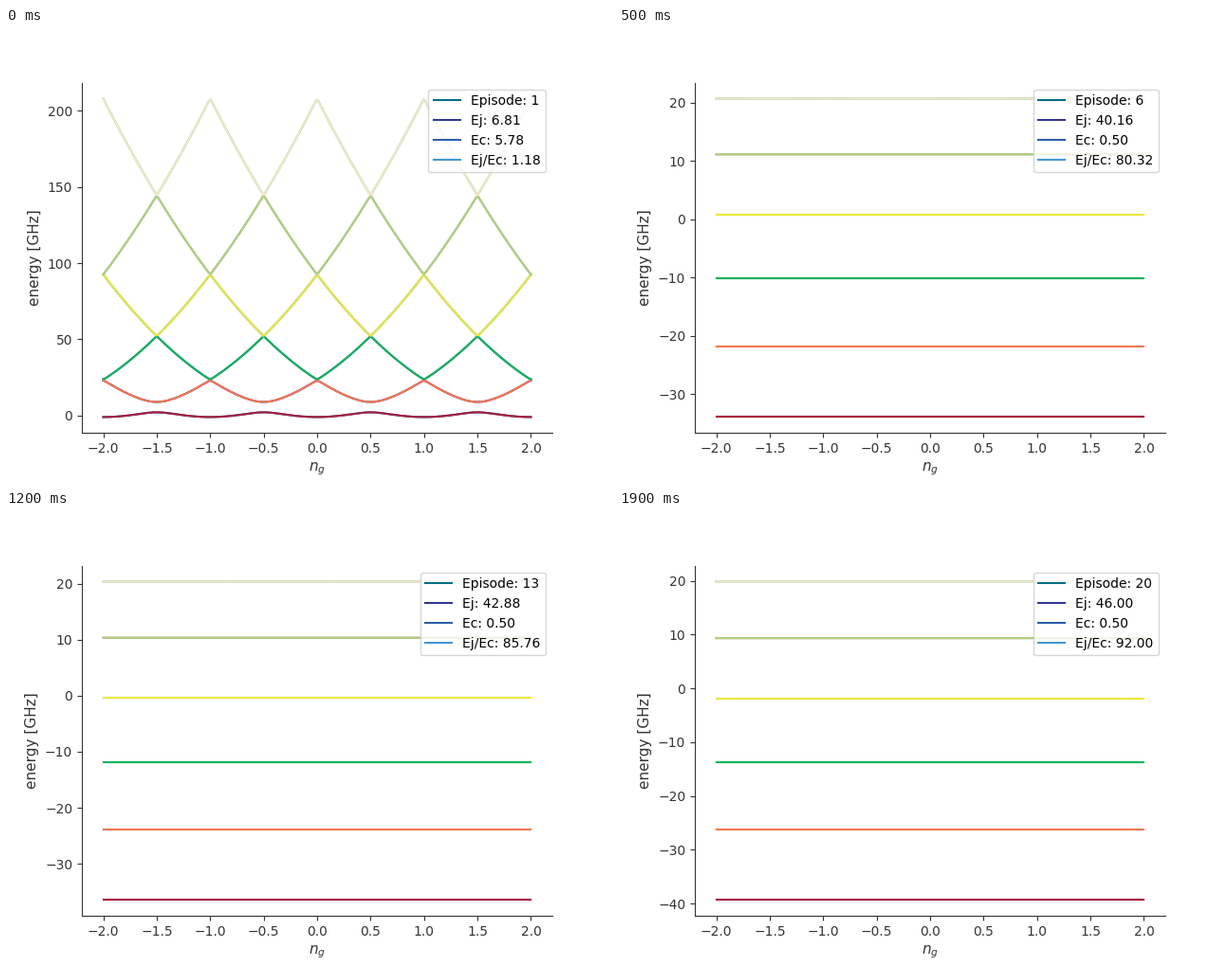
A matplotlib script that plays this animation: 640 px wide and 480 px high, repeating every 2 s.

```python
import numpy as np
import matplotlib.pyplot as plt
from matplotlib.animation import FuncAnimation

GREY = "0.2"
COLORS = ["#016E82", "#333795", "#2E5EAC", "#4498D3", "#CD85B9", "#45C3D1",
          "#AA1D3F", "#F47752", "#19B35A", "#EDE83B", "#ABD379", "#F9E6BE"]
LEVELS = 6
CUTOFF = 15
NG = np.linspace(-2, 2, 220)

# (Ej, Ec) per episode; Ec settles at its lower bound early on
EJ_EC = [(6.81, 5.78), (3.42, 2.87), (0.10, 0.50), (0.10, 0.50), (38.42, 0.50)]
EJ_EC += [(ej, 0.50) for ej in (
    40.16, 46.02, 44.87, 50.00, 47.21, 43.76, 45.32, 42.88,
    43.31, 50.00, 48.40, 42.934, 43.20, 42.61, 46.00)]

plt.rcParams.update({
    "font.family": "DejaVu Sans",
    "font.size": 10,
    "axes.labelsize": 11,
    "axes.edgecolor": GREY,
    "axes.labelcolor": GREY,
    "axes.spines.top": False,
    "axes.spines.right": False,
    "xtick.color": GREY,
    "ytick.color": GREY,
})


def spectrum(ej, ec):
    """Lowest transmon levels for every offset charge."""
    n = np.arange(-CUTOFF, CUTOFF + 1)
    hop = np.eye(len(n), k=1) + np.eye(len(n), k=-1)
    charge = 4 * ec * (n - NG[:, None]) ** 2
    ham = charge[:, :, None] * np.eye(len(n)) - ej / 2 * hop
    return np.linalg.eigvalsh(ham)[:, :LEVELS]


fig, ax = plt.subplots(figsize=(6.4, 4.8), dpi=100)


def draw(i):
    ej, ec = EJ_EC[i]
    energy = spectrum(ej, ec)
    ax.clear()
    ax.set_prop_cycle(color=COLORS)
    # plotted twice: the second half of the colour cycle lies on top
    lines = ax.plot(NG, energy)
    ax.plot(NG, energy)
    ax.set_xlabel("$n_g$")
    ax.set_ylabel("energy [GHz]")
    labels = [f"Episode: {i + 1}", f"Ej: {ej:.2f}", f"Ec: {ec:.2f}",
              f"Ej/Ec: {ej / ec:.2f}"]
    ax.legend(lines[:4], labels, loc="upper right")
    return []


anim = FuncAnimation(fig, draw, frames=len(EJ_EC), interval=100,
                     init_func=lambda: [], repeat=True, repeat_delay=0)
plt.show()
```
